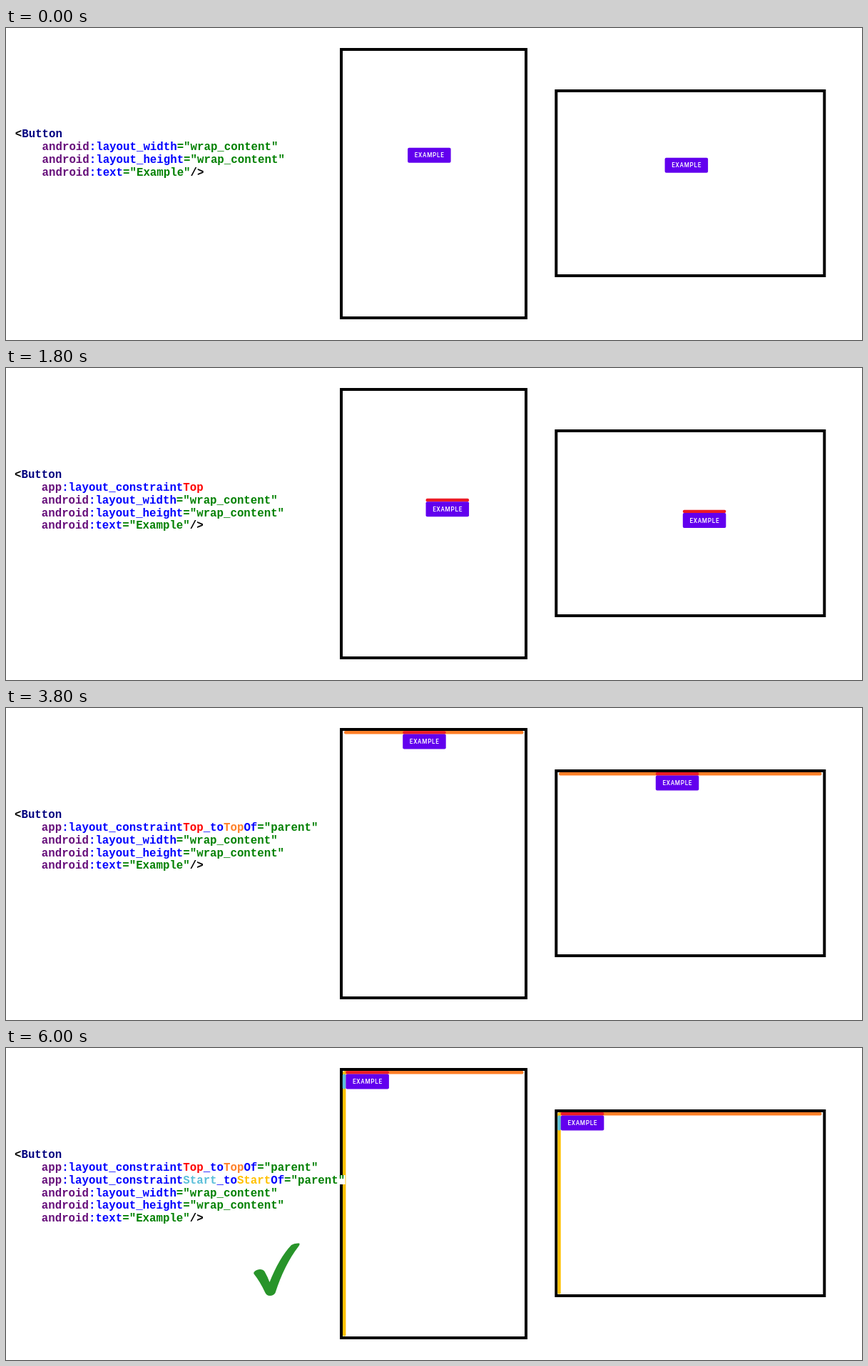
An HTML page that plays this animation: 1200x437 px, repeating every 8 s.

```html
<!DOCTYPE html>
<html lang="en">
<head>
<meta charset="utf-8">
<title>Layout constraints</title>
<style>
  html, body { margin: 0; width: 100%; height: 100%; overflow: hidden; background: #fff; }
  svg { display: block; }
  #code { font: bold 15.75px "Liberation Mono", monospace; }
  .label { font: 500 8.2px Roboto, sans-serif; letter-spacing: .73px; fill: #fff; }
  .tag { fill: #000080; }
  .ns { fill: #660e7a; }
  .attr { fill: #0000ff; }
  .str { fill: #008000; }
  .red { fill: #ed1c24; }
  tspan.red { fill: #ff0000; }
  .orange { fill: #ff7f27; }
  .blue { fill: #5bbfd9; }
  .gold { fill: #ffc000; }
  .frame { fill: none; stroke: #000; stroke-width: 4; }
</style>
</head>
<body>
<svg width="1200" height="437" viewBox="0 0 1200 437">
  <defs>
    <g id="button">
      <rect class="red" data-from="1000" y="-4.4" width="60.5" height="4.4" rx="2"/>
      <rect class="blue" data-from="3900" x="-4.6" width="4.6" height="21" rx="2"/>
      <rect width="60.5" height="21" rx="2" fill="#6200ee"/>
      <text class="label" x="9.6" y="13.4">EXAMPLE</text>
    </g>
  </defs>
  <rect class="frame" x="470" y="30" width="259" height="376"/>
  <rect class="frame" x="771.3" y="88" width="376" height="259"/>
  <g class="orange" data-from="1900">
    <rect x="474" y="32" width="251.5" height="4.4" rx="2"/>
    <rect x="775" y="90" width="368.5" height="4.4" rx="2"/>
  </g>
  <g class="gold" data-from="4800">
    <rect x="472" y="32.5" width="4.4" height="371" rx="1.5"/>
    <rect x="773.3" y="90.5" width="4.4" height="254" rx="1.5"/>
    <rect x="464" y="178" width="11.5" height="13" fill="#fff"/>
  </g>
  <g id="code"></g>
  <use id="portrait" href="#button"/>
  <use id="landscape" href="#button"/>
  <path data-from="6000" fill="#28942a" d="M349 312.5C353 309 360 309 362.5 313Q367 321 369.5 328Q383 294 400 276Q404 273 411 273.5Q412.5 275 410 278Q390 304 377.5 343Q375 347 370 347Q365 347 363 342Q356 327 348 317Q346 315 349 312.5Z"/>
</svg>
<script>
const LOOP = 8000, STEP = 100;
const stageTimes = [1000, 1900, 3900, 4800];

const $ = id => document.getElementById(id);
const span = (cls, text) => `<tspan class="${cls}">${text}</tspan>`;
const attribute = (name, value) =>
  span("ns", "android") + span("attr", ":" + name) + span("str", `="${value}"`);

function constraint(side, sideColor, targetColor, complete) {
  const start = span("ns", "app") + span("attr", ":layout_constraint") + span(sideColor, side);
  if (!complete) return start;
  return start + span("attr", "_to") + span(targetColor, side) +
    span("attr", "Of") + span("str", '="parent"');
}

function codeMarkup(stage) {
  const lines = ["&lt;" + span("tag", "Button")];
  if (stage > 0) lines.push(constraint("Top", "red", "orange", stage > 1));
  if (stage > 2) lines.push(constraint("Start", "blue", "gold", stage > 3));
  lines.push(
    attribute("layout_width", "wrap_content"),
    attribute("layout_height", "wrap_content"),
    attribute("text", "Example") + "/&gt;"
  );
  const left = stage ? 12 : 12.8, top = stage ? 153.8 : 153.2;
  return lines.map((line, i) =>
    `<text x="${left + (i ? 37.8 : 0)}" y="${top + i * 17.9}">${line}</text>`).join("");
}

const mix = (a, b, k) => a + (b - a) * k;
const ramp = (t, from, to) => Math.min(1, Math.max(0, (t - from) / (to - from)));
// cosine wave that peaks at the given time
const wave = (t, peak, period) => Math.cos((t - peak) / period * 2 * Math.PI);

// The button floats freely, is pulled to the top, slides along it, then is pulled to the start.
function place(id, t, center, slideX, corner) {
  const floatX = center.x + 22 * wave(t, 1800, 1400);
  const floatY = center.y + 26 * wave(t, 800, 1180);
  const slide = t > 2800 && t < 4800 ? 17 * (1 - wave(t, 2800, 1000)) : 0;
  const up = ramp(t, 1760, 2700), toStart = ramp(t, 4800, 5400);
  const x = mix(mix(floatX, slideX + slide, up), corner.x, toStart);
  const y = mix(floatY, corner.y, up);
  $(id).setAttribute("transform", `translate(${x} ${y})`);
}

const timed = document.querySelectorAll("[data-from]");
let shownStage = -1;

function draw(now) {
  const t = Math.floor(now % LOOP / STEP) * STEP;
  const stage = stageTimes.filter(s => t >= s).length;
  if (stage !== shownStage) $("code").innerHTML = codeMarkup(shownStage = stage);
  place("portrait", t, { x: 568, y: 179 }, 556.2, { x: 476.4, y: 36.6 });
  place("landscape", t, { x: 928.5, y: 193 }, 910.8, { x: 777.8, y: 94.5 });
  timed.forEach(el => el.style.display = t >= +el.dataset.from ? "" : "none");
}

const begin = performance.now();
function tick() {
  draw(performance.now() - begin);
  requestAnimationFrame(tick);
}
tick();
</script>
</body>
</html>
```
